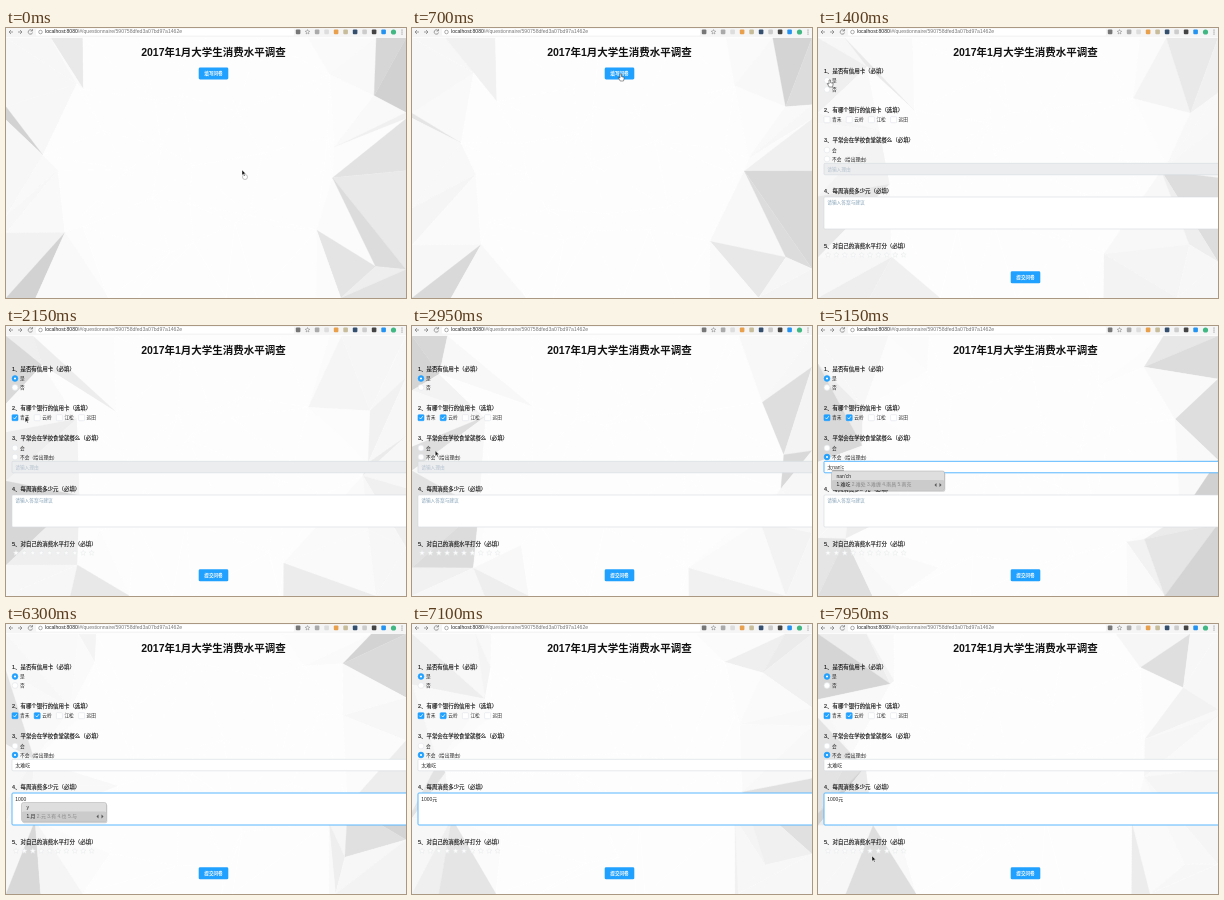
Write an HTML page that moves like this. It is 400 by 270 pixels and loops after 8 s.

```html
<!DOCTYPE html>
<html lang="zh-CN">
<head>
<meta charset="utf-8">
<title>问卷</title>
<style>
html, body { margin: 0; width: 100%; height: 100%; overflow: hidden; background: #fdfdfd; }
svg { display: block; width: 100vw; height: 100vh; }
text { font-family: "Liberation Sans", "Noto Sans CJK SC", "Noto Sans CJK", sans-serif; white-space: pre; }
</style>
</head>
<body>
<svg id="stage" viewBox="0 0 400 270"></svg>
<script>
const LOOP = 8000, BLUE = '#20a0ff', INK = '#777';
const stage = document.getElementById('stage');

const mix = (a, b, k) => a + (b - a) * k;
const clamp = k => Math.max(0, Math.min(1, k));
const ease = k => k * k * (3 - 2 * k);
const range = n => Array.from({ length: n }, (_, i) => i);
const noise = n => {
  const v = Math.sin(n * 127.1 + 3.7) * 43758.5453;
  return v - Math.floor(v);
};

function rect(x, y, w, h, fill, stroke = 'none', rx = 0, sw = .6) {
  return `<rect x="${x}" y="${y}" width="${w}" height="${h}" rx="${rx}" fill="${fill}" stroke="${stroke}" stroke-width="${sw}"/>`;
}
function circle(x, y, r, fill, stroke = 'none', sw = .6) {
  return `<circle cx="${x}" cy="${y}" r="${r}" fill="${fill}" stroke="${stroke}" stroke-width="${sw}"/>`;
}
function path(d, stroke, fill = 'none', sw = .7) {
  return `<path d="${d}" stroke="${stroke}" fill="${fill}" stroke-width="${sw}"/>`;
}
function text(x, y, str, size, fill = '#222', extra = '') {
  return `<text x="${x}" y="${y + size * .36}" font-size="${size}" fill="${fill}" ${extra}>${str}</text>`;
}

// Wandering low-poly mesh, white in the middle and grey towards the rim.
const COLS = 8, ROWS = 5;

function vertex(c, r, t) {
  const n = r * (COLS + 1) + c, turn = t / 1300;
  return [
    c * 400 / COLS + (c % COLS ? 24 * Math.sin(noise(n) * 6.28 + turn) : 0),
    10 + r * 260 / ROWS + (r % ROWS ? 24 * Math.cos(noise(n + 99) * 6.28 + turn) : 0)
  ];
}

function facet(points, n, t) {
  const [cx, cy] = [0, 1].map(j => points.reduce((sum, p) => sum + p[j], 0) / 3);
  const rim = clamp((Math.hypot((cx - 200) / 200, (cy - 130) / 220) - .7) * 4);
  const light = .5 + .5 * Math.sin(noise(n + 300) * 6.28 + t / 900);
  const g = Math.round(253 - rim * (6 + 38 * light ** 3));
  const fill = `rgb(${g},${g},${g})`;
  return `<polygon points="${points.join(' ')}" fill="${fill}" stroke="${fill}" stroke-width=".3"/>`;
}

function background(t) {
  return range(COLS * ROWS).map(i => {
    const c = i % COLS, r = Math.floor(i / COLS);
    const [a, b, d, e] = [[0, 0], [1, 0], [0, 1], [1, 1]].map(([x, y]) => vertex(c + x, r + y, t));
    const pair = noise(i + 500) < .5 ? [[a, b, d], [b, e, d]] : [[a, b, e], [a, e, d]];
    return pair.map((tri, k) => facet(tri, i * 2 + k, t)).join('');
  }).join('');
}

function starPoints(radius) {
  return range(10).map(i => {
    const r = i % 2 ? radius * .45 : radius, a = i * Math.PI / 5;
    return [r * Math.sin(a), -r * Math.cos(a)].map(v => v.toFixed(2));
  }).join(' ');
}
function star(x, y, r, stroke) {
  return `<polygon points="${starPoints(r)}" transform="translate(${x} ${y})" fill="#fcfcfc" stroke="${stroke}" stroke-width=".5"/>`;
}

function toolbar() {
  const tints = ['#777', '', '#aaa', '#ddd', '#e8a04c', '#c8bd9a', '#35506f', '#ccc', '#444', '#2492f0'];
  const icons = tints.map((tint, i) => {
    const x = 292 + i * 9.5;
    return tint ? rect(x - 2.2, 1.6, 4.6, 4.6, tint, 'none', 1) : star(x, 4, 2.4, INK);
  }).join('');
  return rect(0, 0, 400, 9, '#f5f5f5') + rect(30, .8, 258, 6.8, '#fff', 'none', 1) +
    path('M7 4H3M5 2L3 4l2 2M12 4h4M14 2l2 2-2 2M26 2.5a2.2 2.2 0 1 0 .5 2M26.5 1v2h-2', INK) +
    circle(34.5, 4, 1.8, 'none', INK) +
    text(39, 3.5, 'localhost:8080<tspan fill="#777">/#/questionnaire/590758dfed3a07bd97a1462e</tspan>', 5.1) +
    icons + circle(387.5, 4, 2.6, '#41b883') +
    [2, 4, 6].map(y => circle(396, y, .6, INK)).join('');
}

function button(y, label) {
  return rect(192.7, y, 29.6, 12, BLUE, 'none', 1.4) +
    text(207.5, y + 6, label, 4.6, '#fff', 'text-anchor="middle" font-weight="700"');
}

function radio(y, label, on) {
  return circle(9, y, 2.9, on ? BLUE : '#fff', on ? BLUE : '#e0e3e8') +
    (on ? circle(9, y, 1.1, '#fff') : '') + text(14, y, label, 4.7);
}

function checkbox(i, label, on) {
  const x = 9 + i * 22.2;
  return rect(x - 3, 88.7, 6, 6, on ? BLUE : '#fff', on ? BLUE : '#e0e3e8', .8) +
    (on ? path(`M${x - 1.6} 91.7l1.2 1.3 2.2-2.8`, '#fff', 'none', .8) : '') +
    text(x + 5, 91.7, label, 4.7);
}

function field(y, h, state, value, hint) {
  const focus = state === 'focus', off = state === 'off';
  return rect(6, y, 398, h, off ? '#ecedef' : '#fff', focus ? '#58b7ff' : '#d4d8dd', 1, focus ? 1 : .6) +
    (value ? text(9.2, y + 5.8, value, 5) : text(9.2, y + 5.8, hint, 4.7, off ? '#b4c2cf' : '#86a3b8'));
}

function popup(x, y, w, keys, words) {
  const list = words.map((s, i) =>
    `<tspan fill="${i ? '#888' : '#111'}">${i + 1}.${s} </tspan>`).join('');
  return rect(x + .8, y + 1.2, w, 19.5, 'rgba(0,0,0,.18)', 'none', 2) +
    rect(x, y, w, 19, '#dedede', '#aaa', 2, .5) + rect(x + .3, y + 9, w - .6, 9.7, '#cbcbcb', 'none', 1.6) +
    text(x + 5, y + 5, keys, 5) + text(x + 5, y + 13.6, list, 4.9) +
    path(`M${x + w - 8} ${y + 12}l-2 2 2 2zM${x + w - 5} ${y + 12}l2 2-2 2z`, 'none', '#555');
}

// Letters of a word shown so far, one every `step` ms.
const spell = (word, from, step, t) => word.slice(0, Math.max(0, Math.floor((t - from) / step) + 1));

// Words entered through the input method; each replaces its keys when done.
const words = {
  too: { keys: 'tai', from: 4350, step: 100, end: 4750, out: '太', list: ['太', '台', '泰', '抬', '态'] },
  bad: { keys: "nan'chi", from: 4850, step: 60, end: 5500, out: '难吃', list: ['难吃', '难处', '难缠', '南昌', '南充'] },
  yuan: { keys: 'yuan', from: 6250, step: 140, end: 6900, out: '元', list: ['月', '元', '有', '也', '与'] }
};
const isLive = (w, t) => t >= w.from && t < w.end;

function typed(w, t) {
  if (t >= w.end) return w.out;
  const live = spell(w.keys, w.from + w.step, w.step, t);
  return live && `<tspan text-decoration="underline">${live}</tspan>`;
}
function suggest(w, x, y, width, t) {
  return isLive(w, t) ? popup(x, y, width, spell(w.keys, w.from, w.step, t), w.list) : '';
}

function form(t) {
  const head = (y, s) => text(6, y, s, 5.45, '#111', 'stroke="#111" stroke-width=".12"');
  const reasonState = t < 3350 ? 'off' : t >= 3900 && t < 5750 ? 'focus' : 'on';
  const reason = typed(words.too, t) + typed(words.bad, t);
  const spend = spell('1000', 5900, 100, t) + typed(words.yuan, t);
  const banks = ['青禾', '云岭', '江松', '远田'];
  return head(43, '1、是否有信用卡（必填）') +
    radio(52.5, '是', t >= 1500) + radio(61.5, '否', false) +
    head(82, '2、有哪个银行的信用卡（选填）') +
    banks.map((name, i) => checkbox(i, name, i < 2 && t >= 2000 + i * 400)).join('') +
    head(112.5, '3、平常会在学校食堂就餐么（必填）') +
    radio(122, '会', false) + radio(131, '不会（给出理由）', t >= 3350) +
    field(135.3, 11.5, reasonState, reason, '请输入理由') +
    head(163.5, '4、每周消费多少元（必填）') +
    field(169, 32, t >= 5750 ? 'focus' : 'on', spend, '请输入答案与建议') +
    head(218, '5、对自己的消费水平打分（必填）') +
    range(10).map(i => star(10 + i * 8.4, 227, 2.8, '#e6e8eb')).join('') +
    button(243.3, '提交问卷') +
    (t >= 3900 && t < 4350 ? path('M9 138.5v5', '#333', 'none', .4) : '') +
    suggest(words.too, 11, 145, 113, t) + suggest(words.bad, 13.5, 145, 113, t) +
    suggest(words.yuan, 15.5, 178.5, 85, t);
}

// Pointer stops: arrival time, x, y.
const TRAVEL = 380;
const stops = [[0, 236, 142], [600, 207, 46], [1250, 10, 52], [1900, 9, 91], [2350, 31, 91],
  [2900, 25, 124], [3250, 10, 131], [3850, 11, 141], [5720, 24, 182], [7600, 54, 232]];

function pointer(t) {
  const typing = t > 4000 && t < 5500 || t > 5850 && t < 7200;
  if (typing) return '';
  const [x, y] = stops.slice(1).reduce(([px, py], [at, sx, sy]) => {
    const k = ease(clamp((t - at + TRAVEL) / TRAVEL));
    return [mix(px, sx, k), mix(py, sy, k)];
  }, stops[0].slice(1));
  const wait = t < 200 ? circle(3, 7, 2.5, '#fff', '#999') : '';
  const hand = t >= 550 && t < 900 || t >= 1200 && t < 1650;
  const shape = hand
    ? path('M1 0v4L-.8 3.5l2 3.5h3.3l.8-3.5-2.8-.9V0z', '#333', '#fff', .5)
    : path('M0 0v5.2l1.3-1.1 1 2 .8-.4-1-1.900h1.7z', '#fff', '#111', .4);
  return `<g transform="translate(${x} ${y})">${wait}${shape}</g>`;
}

function render(t) {
  stage.innerHTML = background(t) + toolbar() +
    text(207.5, 24.5, '2017年1月大学生消费水平调查', 10.5, '#111', 'font-weight="700" text-anchor="middle"') +
    (t < 850 ? button(39.5, '填写问卷') : form(t)) + pointer(t);
}

const start = performance.now();
function tick() {
  render((performance.now() - start) % LOOP);
  requestAnimationFrame(tick);
}
tick();
</script>
</body>
</html>
```
